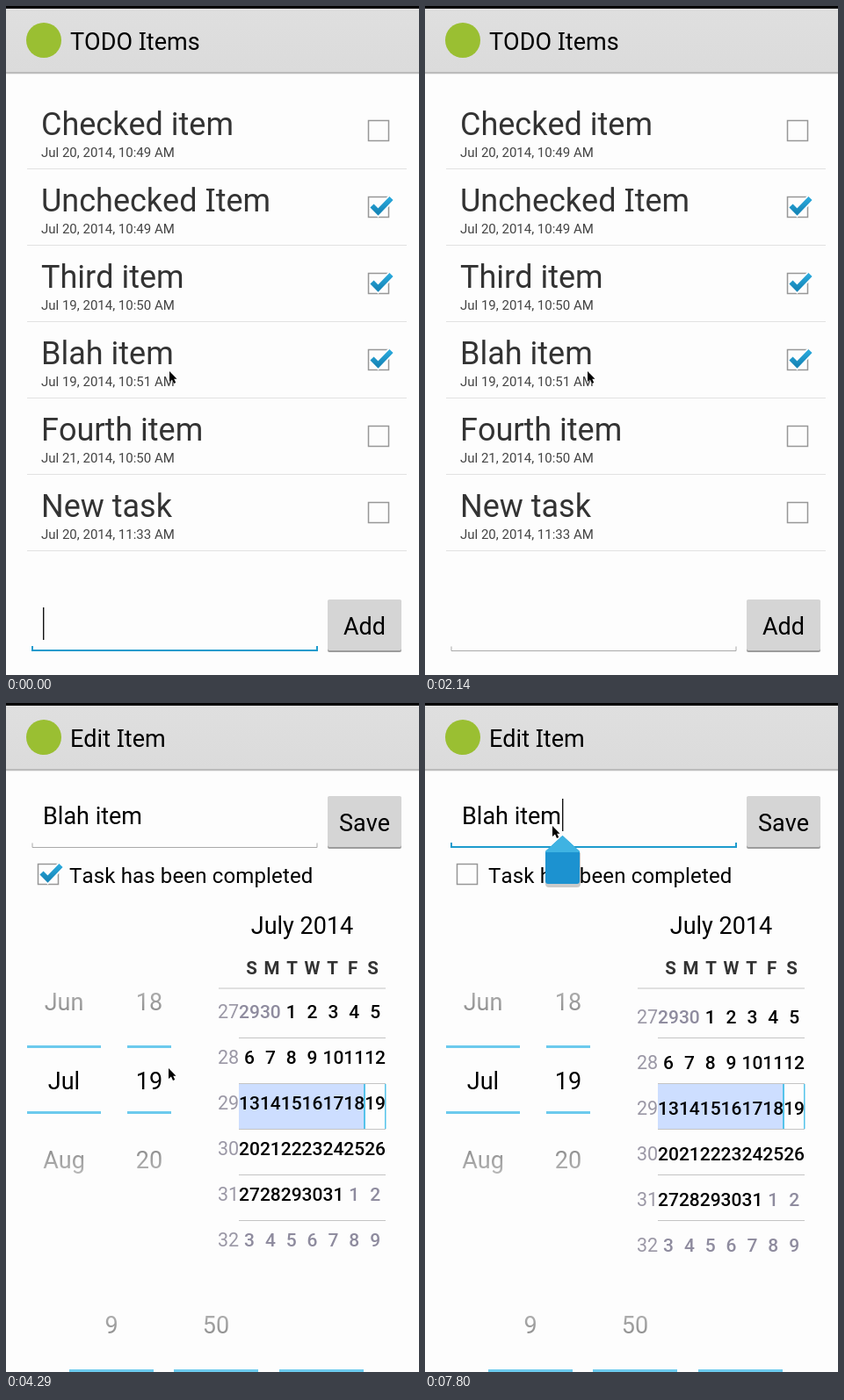
These frames come from a looping animation (470 px wide and 762 px high, 8 s). An HTML page:

```html
<!DOCTYPE html>
<html lang="en">
<head>
<meta charset="utf-8">
<title>TODO Items</title>
<style>
  html, body { margin: 0; width: 100%; height: 100%; overflow: hidden; background: #fdfdfd; }
  svg { display: block; width: 470px; height: 762px; overflow: hidden; }
  text { font-family: Roboto, sans-serif; font-kerning: none; white-space: pre; }
  .cap-i { font-family: "Noto Sans", sans-serif; }

  .anim { animation: 8s step-end infinite; }
  #list-caret { animation-name: list-caret; }
  #list-focus { animation-name: list-focus; }
  #list-blur { animation-name: list-blur; }
  #pressed { animation-name: pressed; }
  #dim { animation-name: dim; }
  #edit { animation-name: open; transform-origin: 240px 364px; }
  #days { animation-name: settle; }
  #done { animation-name: done; }
  #edit-focus { animation-name: edit-focus; }
  #edit-blur { animation-name: edit-blur; }
  #edit-caret { animation-name: edit-caret; }
  #handle { animation-name: handle; }
  #pointer { animation-name: pointer; }

  @keyframes list-caret { 0% { opacity: 1 } 3.25% { opacity: 0 } 10% { opacity: 1 } 16.625%, 100% { opacity: 0 } }
  @keyframes list-focus { 0% { opacity: 1 } 16.625%, 100% { opacity: 0 } }
  @keyframes list-blur { 0% { opacity: 0 } 16.625%, 100% { opacity: 1 } }
  @keyframes pressed { 0% { opacity: 0 } 13.375% { opacity: 1 } 16.625%, 100% { opacity: 0 } }
  @keyframes dim { 0% { opacity: 0 } 47% { opacity: .02 } 50.375% { opacity: .105 } 53.625%, 100% { opacity: 0 } }
  @keyframes open {
    0% { opacity: 0; transform: scale(.871) }
    47% { opacity: .4; transform: scale(.871) }
    50.375% { opacity: .6; transform: scale(.905) }
    53.625%, 100% { opacity: 1; transform: none }
  }
  @keyframes settle { 0% { transform: translateY(-6px) } 57%, 100% { transform: none } }
  @keyframes done { 0% { opacity: 1 } 73.875%, 100% { opacity: 0 } }
  @keyframes edit-focus { 0% { opacity: 0 } 80.625%, 100% { opacity: 1 } }
  @keyframes edit-blur { 0% { opacity: 1 } 80.625%, 100% { opacity: 0 } }
  @keyframes edit-caret { 0% { opacity: 0 } 80.625% { opacity: 1 } 90.75% { opacity: 0 } 94.125%, 100% { opacity: 1 } }
  @keyframes handle { 0% { opacity: 0 } 84%, 100% { opacity: 1 } }
  @keyframes pointer {
    0% { transform: translate(186px, 416px) }
    26.75% { transform: translate(185px, 416px) }
    57% { transform: translate(177px, 236px) }
    60.375% { transform: translate(64px, 194px) }
    63.75% { transform: translate(55px, 192px) }
    67.125% { transform: translate(54px, 194px) }
    73.875% { transform: translate(68px, 185px) }
    77.25% { transform: translate(146px, 141px) }
    97.5%, 100% { transform: translate(145px, 140px) }
  }
</style>
</head>
<body>
<svg id="stage" viewBox="0 0 470 762"></svg>
<script>
const rect = (x, y, w, h, fill, extra = '') =>
  `<rect x="${x}" y="${y}" width="${w}" height="${h}" fill="${fill}" ${extra}/>`;

// Capital I carries serifs, unlike the other letters.
const text = (x, y, size, str, fill = '#000', extra = '') =>
  `<text x="${x}" y="${y}" font-size="${size}" fill="${fill}" ${extra}>` +
  str.replace(/I/g, '<tspan class="cap-i">I</tspan>') + '</text>';

const centred = (x, y, size, str, fill, extra = '') =>
  text(x, y, size, String(str), fill, 'text-anchor="middle" ' + extra);

const group = (id, body) => `<g id="${id}" class="anim">${body}</g>`;

const header = title =>
  rect(0, 3, 480, 72, 'url(#bar)') + rect(0, 75, 480, 2, '#bcbcbc') + rect(0, 77, 480, 1, '#ececec') +
  '<circle cx="43" cy="39" r="20" fill="#9abf32"/>' + text(73, 49.5, 27, title);

const box = (cx, cy) =>
  `<rect x="${cx - 11.5}" y="${cy - 11.5}" width="23" height="23" fill="#fdfdfd" stroke="#979797" stroke-width="1.5"/>`;

const tick = (cx, cy) => {
  const d = `M${cx - 7.5} ${cy - 1.5}l7 7L${cx + 14.5} ${cy - 10}`;
  return `<path d="${d}" fill="none" stroke="#fdfdfd" stroke-width="9"/>` +
    `<path d="${d}" fill="none" stroke="url(#blue)" stroke-width="5.8"/>`;
};

const button = (y, label) =>
  rect(366, y + 1, 84, 59, '#9c9c9c', 'rx="2"') + rect(366, y, 84, 58, '#d5d5d5', 'rx="2"') +
  centred(408, y + 39.5, 27, label);

const underline = (y, color, width) =>
  `<path d="M30 ${y - 5}V${y}H354V${y - 5}" fill="none" stroke="${color}" stroke-width="${width}"/>`;

function listScreen() {
  const items = [
    ['Checked item', 'Jul 20, 2014, 10:49 AM', 0],
    ['Unchecked Item', 'Jul 20, 2014, 10:49 AM', 1],
    ['Third item', 'Jul 19, 2014, 10:50 AM', 1],
    ['Blah item', 'Jul 19, 2014, 10:51 AM', 1],
    ['Fourth item', 'Jul 21, 2014, 10:50 AM', 0],
    ['New task', 'Jul 20, 2014, 11:33 AM', 0]
  ];
  const rows = items.map(([name, date, checked], i) => {
    const y = 87 * i;
    return text(40, 146.5 + y, 36, name, '#333') + text(40, 172, 15, date, '#444', `transform="translate(0 ${y})"`) +
      box(424, 142 + y) + (checked ? tick(424, 142 + y) : '') + rect(24, 185 + y, 432, 1, '#e2e2e2');
  });
  return rect(0, 0, 470, 762, '#fdfdfd') + header('TODO Items') +
    group('pressed', rect(24, 360, 432, 86, '#eeeaed')) + rows.join('') +
    group('list-focus', underline(734, '#1d9bcd', 2)) +
    group('list-blur', underline(734.5, '#a9a9a9', 1)) +
    group('list-caret', rect(42, 685, 1.4, 37, '#111')) + button(676, 'Add');
}

function calendar() {
  const col = i => 277 + 23.85 * i;
  let lines = rect(242, 324.5, 190, 1, '#c4c4c4') + rect(265, 434, 142, 51, '#cddeff');
  let days = '';
  for (let r = 0; r < 6; r++) {
    const y = 364.5 + 52 * r;
    if (r) lines += rect(265, 329 + 52 * r, 167, 1, '#c4c4c4');
    days += centred(253, y, 21.5, 27 + r, '#9b98a6');
    for (let c = 0; c < 7; c++) {
      const date = new Date(2014, 5, 29 + 7 * r + c);
      days += centred(col(c), y, 21, date.getDate(), date.getMonth() === 6 ? '#000' : '#8e8b9e', 'font-weight="500"');
    }
  }
  const names = [...'SMTWTFS'].map((d, i) => centred(279.5 + 23 * i, 309, 20.5, d, '#333', 'font-weight="700"'));
  return centred(337, 263, 27, 'July 2014') + names.join('') + lines +
    rect(407, 434, 2, 51, '#55c3ea') + rect(431, 434, 1.5, 51, '#55c3ea') + group('days', days);
}

function picker(x, width, labels) {
  const fills = ['url(#fade-up)', '#000', 'url(#fade-down)'];
  return labels.map((s, i) => centred(x, 349.5 + 90 * i, 27, s, fills[i])).join('') +
    [390, 465].map(y => rect(x - width / 2, y, width, 3, '#6ccaed')).join('');
}

function editScreen() {
  const time = [72, 191, 311].map(x => rect(x, 759, 96, 3, '#6ccaed')).join('');
  return rect(0, 3, 480, 761, '#fdfdfd') + header('Edit Item') +
    text(42, 138, 27, 'Blah item') + button(106, 'Save') +
    group('edit-blur', underline(164.5, '#a9a9a9', 1)) +
    group('edit-focus', underline(164, '#1d9bcd', 2)) +
    group('edit-caret', rect(156, 109, 1.4, 37, '#111')) +
    box(48, 195) + group('done', tick(48, 195)) +
    text(72, 204.5, 24, 'Task has been completed', '#000', 'letter-spacing=".15"') +
    picker(66, 84, ['Jun', 'Jul', 'Aug']) + picker(163, 50, ['18', '19', '20']) + calendar() +
    centred(120, 718, 27, '9', 'url(#fade-up)') + centred(239, 718, 27, '50', 'url(#fade-up)') + time +
    rect(470, 81, 5, 514, '#b5b5b5') +
    group('handle',
      '<path d="M157 153L177 171V206Q177 210 173 210H141Q137 210 137 206V171Z" fill="#000" opacity=".2"/>' +
      '<path d="M156.500 151L176 169V203Q176 206 173 206H140Q137 206 137 203V169Z" fill="#1c92d0"/>' +
      '<path d="M156.500 151L176 169V170H137V169Z" fill="#3fb3e2"/>');
}

const gradient = (id, from, to, dir = 'x2="0" y2="1"') =>
  `<linearGradient id="${id}" ${dir}><stop stop-color="${from}"/><stop offset="1" stop-color="${to}"/></linearGradient>`;

document.getElementById('stage').innerHTML =
  '<defs>' + gradient('bar', '#dfdfdf', '#dbdbdb') + gradient('blue', '#2aa9dc', '#1787b9') +
  gradient('fade-up', '#b4b4b4', '#888') + gradient('fade-down', '#888', '#b8b8b8') + '</defs>' +
  listScreen() + group('dim', rect(0, 3, 470, 759, '#140014')) + group('edit', editScreen()) +
  rect(0, 0, 470, 3, '#000') +
  group('pointer', '<path d="M0 0V12L3 9.500L5 14L7.200 13L5.200 8.800H8.500Z" fill="#000" stroke="#fff" stroke-width=".7" paint-order="stroke"/>');
</script>
</body>
</html>
```
